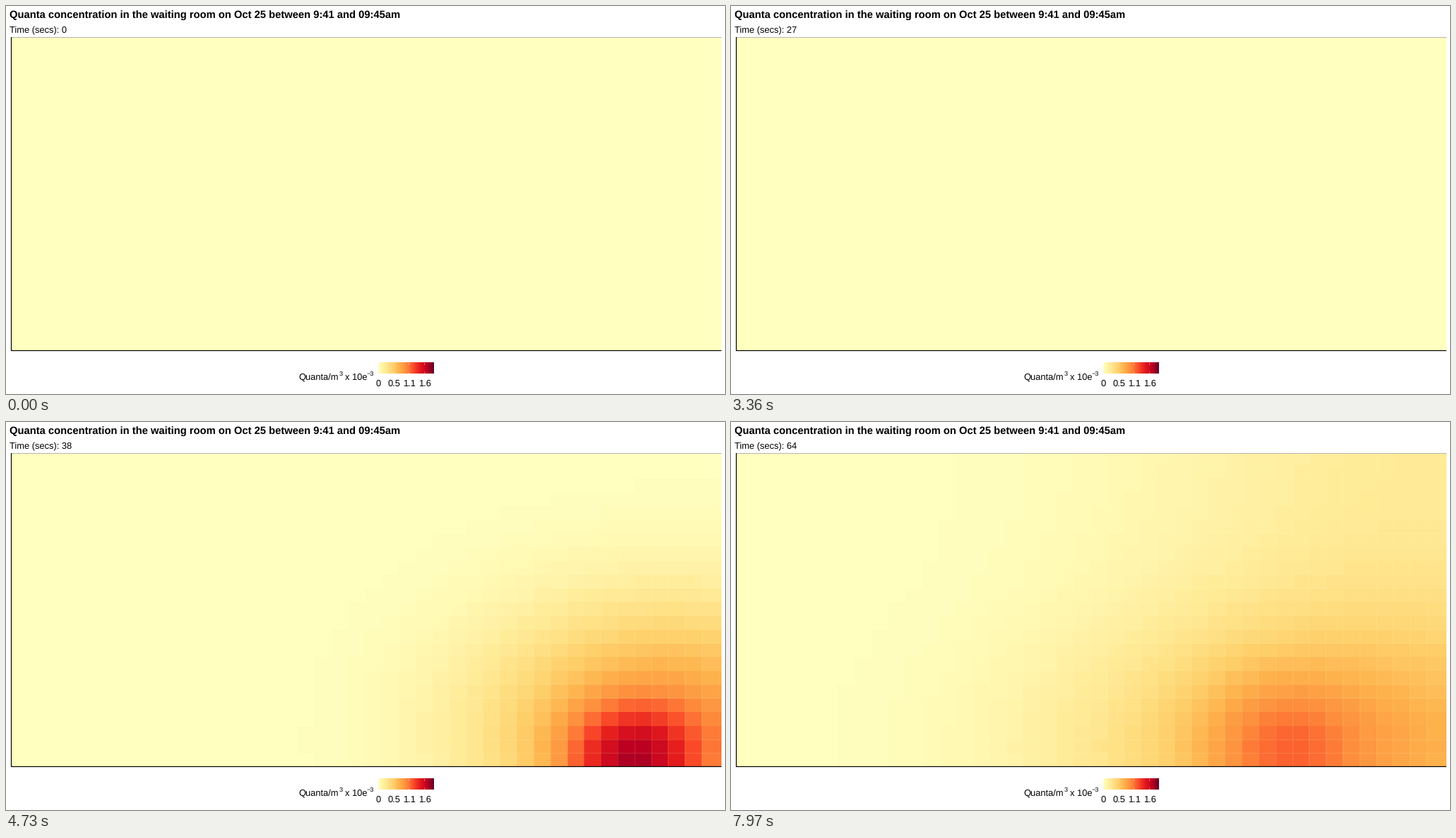
A matplotlib script that plays this animation: 1018x550 px, repeating every 8000 ms.

```python
import numpy as np
import matplotlib.pyplot as plt
from matplotlib.animation import FuncAnimation
from matplotlib.colors import LinearSegmentedColormap

W, H, DPI = 1018, 550, 100
LOOP, INTERVAL = 8000, 20
SECOND = 124.4  # ms of screen time per simulated second
START = 28      # second of the first emission
COLS, ROWS, COL_W, ROW_H = 42, 23, 23.82, 19.5
LEFT, RIGHT, TOP, BOTTOM = 8, 1013, 44, 488

plt.rcParams["font.family"] = "Liberation Sans"
plt.rcParams["text.hinting"] = "none"

SCALE = ["#ffffc0", "#ffeb98", "#fed470", "#feb24c", "#fd8d3c",
         "#fc4e2a", "#e31a1c", "#c00021", "#620026"]
stepped = LinearSegmentedColormap.from_list("stepped", SCALE, N=100)
smooth = LinearSegmentedColormap.from_list("smooth", SCALE, N=256)

fig = plt.figure(figsize=(W / DPI, H / DPI), dpi=DPI, facecolor="white")
ax = fig.add_axes([0, 0, 1, 1])
ax.axis("off")


def label(x, y, text, px=12.9, **kw):
    return ax.text(x, y, text, fontsize=px * 72 / DPI, color="black",
                   va="baseline", **kw)


def line(xs, ys, color="black", px=1.0, **kw):
    ax.plot(xs, ys, color=color, lw=px * 72 / DPI, solid_capstyle="butt",
            snap=False, zorder=3, **kw)


# Room grid: the last column reaches the panel edge, the top row is cut by it.
x_edges = 8.5 + COL_W * np.arange(COLS + 1)
y_edges = 489 - ROW_H * np.arange(ROWS + 1)
cx, cy = np.meshgrid(x_edges[:-1] + COL_W / 2, y_edges[:-1] - ROW_H / 2)
x_edges[[0, -1]] = LEFT, RIGHT
y_edges[[0, -1]] = BOTTOM, TOP


def bell(d, spread):
    return np.exp(-.5 * (d / spread) ** 2)


def settle(age, pace):
    return 1 - np.exp(-max(age, 0) / pace)


def concentration(t):
    """A moving hot core, the cloud it sheds and a slow rise in the far air."""
    age = t - START
    if age < 0:
        return np.zeros_like(cx)

    def along(*points):
        return np.interp(t, [START, 34, 38, 42, 64], points)

    core = (along(.12, .15, .47, .24, .22)
            * bell(cx - along(890, 975, 885, 779, 777), 22 + 58 * settle(age, 7))
            * bell(cy - along(476, 362, 480, 466, 466), 20 + 57 * settle(age, 12)))
    lean = bell(t - 35, 4.2)
    cloud = (along(.02, .26, .47, .33, .28)
             * bell(cx - 865 - 95 * lean, 95 * max(age, .2) ** .29)
             * bell(cy - 460 + 25 * lean, 128 * settle(age + 1, 2)))
    haze = .14 * settle(t - 38, 10) * bell(cx - 980, 210 + 2.2 * age)
    return core + cloud + haze


mesh = ax.pcolormesh(x_edges, y_edges, np.zeros_like(cx), cmap=stepped,
                     vmin=0, vmax=1, antialiased=False, edgecolors="none")

# Faint seams between the tiles
for x in x_edges[1:-1]:
    x = round(x) + .5
    line([x, x], [TOP, BOTTOM], SCALE[0], alpha=.13)
for k, y in enumerate(y_edges):
    if k % 4 in (1, 2):
        y = int(y) + .5
        line([LEFT, RIGHT], [y, y], SCALE[0], alpha=.15)

line([LEFT, RIGHT], [TOP + .5] * 2, "#b4b4b4")
line([LEFT - .5] * 2, [TOP, BOTTOM + 1], px=1.2)
line([LEFT - 1, RIGHT], [BOTTOM + .5] * 2, px=1.2)

label(4.6, 17.4, "Quanta concentration in the waiting room on Oct 25 "
      "between 9:41 and 09:45am", 14.7, weight="bold")
clock = label(4.8, 38, "")

# Legend
label(414.4, 529.7, "Quanta/m")
label(471.4, 523.6, "3", 9.1)
label(480.2, 529.7, "x 10e")
label(511, 523.6, "\u22123", 9.1)
ax.imshow(np.linspace(0, 1, 256)[None, :], cmap=smooth, aspect="auto",
          extent=(527.5, 606.5, 521.5, 506), interpolation="nearest")
for i, text in enumerate(["0", "0.5", "1.1", "1.6"]):
    x = 527.4 + 21.7 * i
    label(x, 538.6, text, ha="center")
    for y in (506, 518.5):
        line([x, x], [y, y + 3], "white", .7, alpha=.55)

ax.set_xlim(0, W)
ax.set_ylim(H, 0)


def update(i):
    second = int((i * INTERVAL + 12) / SECOND)
    mesh.set_array(concentration(second))
    clock.set_text(f"Time (secs): {second}")
    return mesh, clock


anim = FuncAnimation(fig, update, frames=LOOP // INTERVAL, interval=INTERVAL,
                     repeat=True, repeat_delay=0)
plt.show()
```
